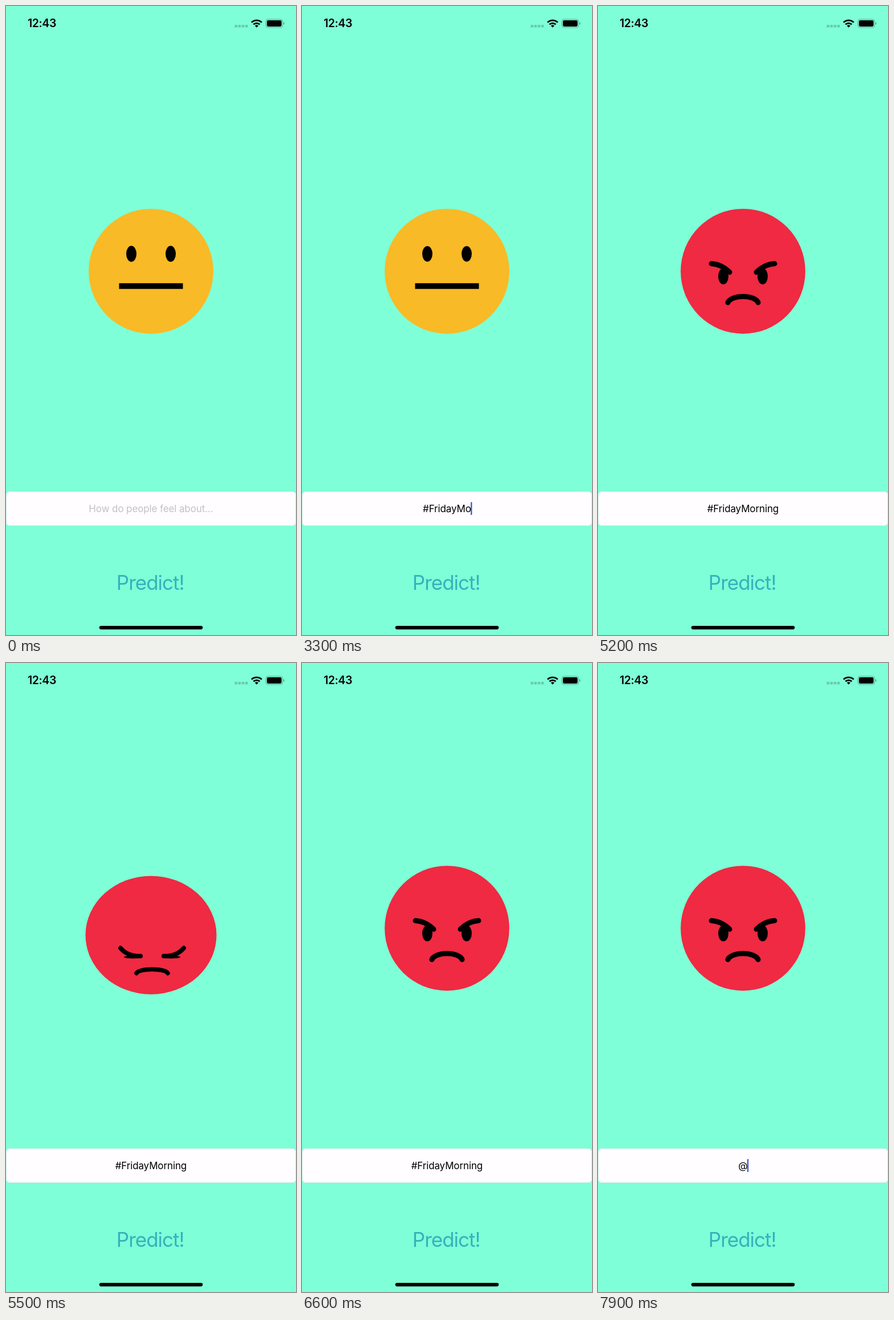
These frames come from a looping animation (509 px wide and 1101 px high, 8 s). An HTML page:

```html
<!DOCTYPE html>
<html lang="en">
<head>
<meta charset="utf-8">
<title>Mood predictor</title>
<style>
  html, body { margin: 0; width: 100%; height: 100%; overflow: hidden; background: #7fffd7; }
  svg { display: block; width: 100%; height: 100%; }
  text { font-family: Inter, Roboto, sans-serif; }
  #entry { font-size: 17px; letter-spacing: -.12px; text-anchor: middle; }
</style>
</head>
<body>
<svg viewBox="0 0 509 1101">
  <rect width="509" height="1101" fill="#7fffd7"/>

  <text x="37.9" y="37.3" font-size="19.5" font-weight="600" letter-spacing="-.4">12:43</text>
  <path d="M401.5 35.3h23" stroke="#66ccad" stroke-width="4.6" stroke-dasharray="4.6 1.5"/>
  <g fill="none" stroke="#000" stroke-width="2.9">
    <path d="M431 28.6a13 13 0 0 1 17.8 0"/>
    <path d="M434.4 32.3a8 8 0 0 1 11 0"/>
  </g>
  <path d="M439.9 37.8l-3.1-3.2a4.5 4.5 0 0 1 6.2 0z"/>
  <rect x="456" y="23.2" width="29.6" height="14.6" rx="4" fill="none" stroke="#53a68d"/>
  <rect x="457.9" y="25.1" width="25.8" height="10.8" rx="2.4"/>
  <path d="M487 28v5q1.6-.8 1.6-2.5t-1.6-2.5z" fill="#53a68d"/>

  <g id="face">
    <ellipse id="head"/>
    <g id="features">
      <ellipse class="eye"/>
      <ellipse class="eye"/>
      <g id="brows" fill="none" stroke="#000" stroke-linecap="round">
        <path class="brow"/>
        <path class="brow"/>
      </g>
      <path id="mouth" fill="none" stroke="#000"/>
    </g>
  </g>

  <rect x=".5" y="850" width="508" height="59.5" rx="5.5" fill="#fffdff" stroke="#d3e6e1" stroke-width=".7"/>
  <text id="entry" x="254.4" y="886"></text>
  <rect id="caret" y="868.3" width="2.5" height="22.6" rx="1" fill="#4a62d2"/>

  <text x="253.2" y="1022" font-size="35" letter-spacing="-1" text-anchor="middle" fill="#34b3bc">Predict!</text>
  <rect x="163.7" y="1085" width="181.6" height="6.2" rx="3.1"/>
</svg>
<script>
const LOOP = 8000, STEP = 100;
const BLINK = 700, BLINK_LEN = 1233;
const MORPH = 4900, BOUNCE = 5200, BOUNCE_LEN = 1500;
const TAG = "#FridayMorning", HINT = "How do people feel about...";
const YELLOW = [248, 186, 38], RED = [239, 42, 66];

const $ = id => document.getElementById(id);
const all = name => [...document.querySelectorAll("." + name)];
const eyes = all("eye"), brows = all("brow");
const entry = $("entry"), caret = $("caret");

const set = (el, attrs) => { for (const k in attrs) el.setAttribute(k, attrs[k]); };
const clamp = x => Math.max(0, Math.min(1, x));
const lerp = (a, b, k) => a + (b - a) * k;
// Rises from 0 to 1 and back between two times
const hump = (t, from, to) => Math.sin(Math.PI * clamp((t - from) / (to - from)));

function lidAt(t) {
  if (t < BLINK || t >= MORPH) return 1;
  const ms = (t - BLINK) % BLINK_LEN;
  return 1 + .06 * hump(ms, -100, 130) - .9 * hump(ms, 130, 500);
}

function drawFace(t) {
  const anger = clamp((t - MORPH) / (BOUNCE - MORPH));
  const ms = Math.max(0, t - BOUNCE) % BOUNCE_LEN;
  const squash = 1.05 * hump(ms, 0, 500);
  const hop = hump(ms, 330, 900);
  const land = hump(ms, 850, 1150);

  const top = 355 + 17.7 * squash - 31 * hop + 3 * land;
  const bottom = 573.7 + 6.3 * squash - 26 * hop + land;
  const color = YELLOW.map((v, i) => Math.round(lerp(v, RED[i], anger)));
  set($("face"), { transform: `translate(254.5 ${(top + bottom) / 2})` });
  set($("head"), {
    rx: 109.4 + 5.6 * squash - 4 * hop + 2 * land,
    ry: (bottom - top) / 2,
    fill: `rgb(${color})`
  });
  set($("features"), { transform: `translate(${2 * squash} 0)` });

  // Left half, mirrored to the right
  const eye = {
    cy: lerp(-30.5, 8.9, anger) + 29.6 * squash,
    rx: 9 + 7.5 * squash,
    ry: Math.max(1, (14 - 11.5 * squash) * lidAt(t))
  };
  [-1, 1].forEach((side, i) => {
    const at = (x, y) => `${x * side} ${y}`;
    set(eyes[i], { cx: (34.5 - 1.5 * squash) * side, ...eye });
    set(brows[i], {
      d: `M${at(55.5, -13.3 + 36 * squash)}` +
         `Q${at(38 + 5 * squash, -12.5 + 50 * squash)} ` +
         at(23.5 - 3 * squash, 1.7 + 35 * squash)
    });
  });
  set($("brows"), { opacity: anger, "stroke-width": 9 - squash });

  const half = lerp(56, 26.5, anger) + squash;
  const y = lerp(26, 54.7, anger) + 12 * squash;
  const curve = y - 14 * anger + 5 * squash;
  set($("mouth"), {
    d: `M${-half} ${y}C${-half * .8} ${curve} ${half * .8} ${curve} ${half} ${y}`,
    "stroke-width": 10 - anger - 1.5 * squash,
    "stroke-linecap": anger ? "round" : "butt"
  });
}

function typedAt(t) {
  if (t >= 7800) return "@";
  if (t >= 6900) return "";
  // A quick first word, a pause, then a slower second word
  const count = t < 3100 ? Math.min(7, (t - 2200) / 100) : 8 + (t - 3100) / 150;
  return TAG.slice(0, Math.max(0, Math.floor(count)));
}

function drawEntry(t) {
  const typed = typedAt(t), content = typed || HINT;
  if (entry.textContent !== content) entry.textContent = content;
  set(entry, { fill: typed ? "#000" : "#c3c1c5" });

  const half = entry.getComputedTextLength() / 2;
  const focused = (t >= 1400 && t < 4800) || t >= 6900;
  set(caret, {
    x: 254.4 + (typed ? half - .8 : -half - 2.7),
    visibility: focused ? "visible" : "hidden"
  });
}

const start = performance.now();
function frame() {
  const t = Math.floor(((performance.now() - start) % LOOP) / STEP) * STEP;
  drawFace(t);
  drawEntry(t);
  requestAnimationFrame(frame);
}
frame();
</script>
</body>
</html>
```
